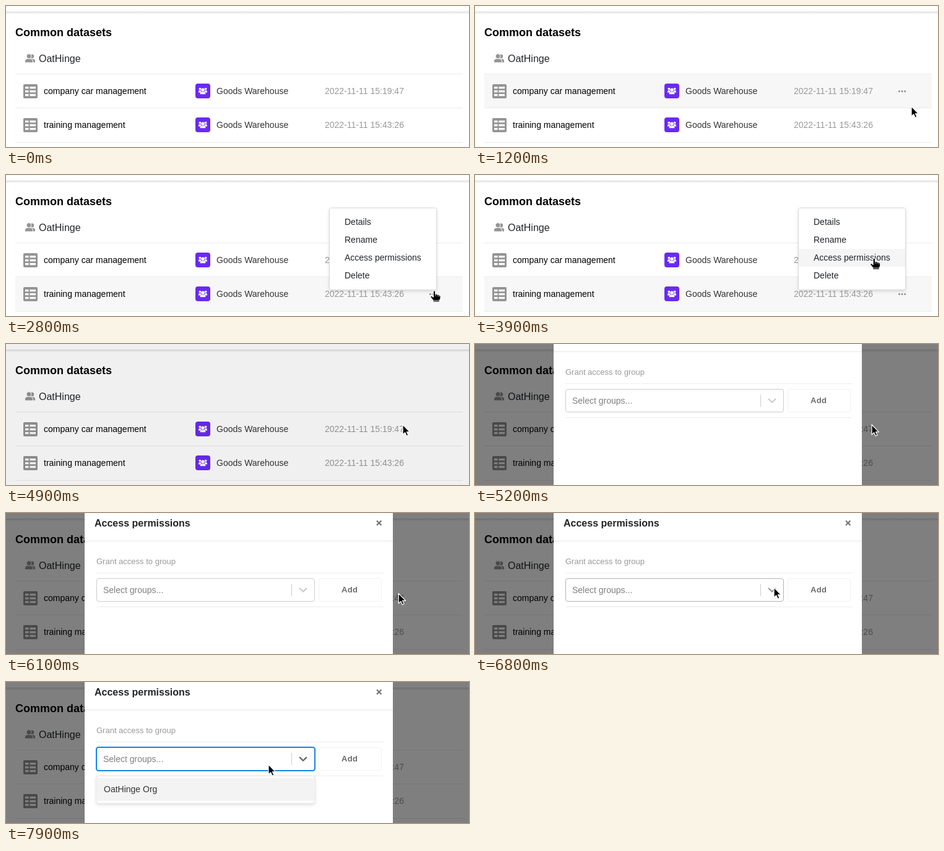
Write an HTML page that moves like this. It is 748 px wide and 229 px high and loops after 8 s.

```html
<!DOCTYPE html>
<html lang="en">
<head>
<meta charset="utf-8">
<title>Access permissions</title>
<style>
  html, body { margin: 0; width: 100%; height: 100%; overflow: hidden; background: #fff; }
  svg { display: block; font: 14px "Liberation Sans", Arial, sans-serif; }
  text { white-space: pre; }
</style>
</head>
<body>
<svg width="748" height="229" viewBox="0 0 748 229">
  <defs>
    <linearGradient id="fade" x2="0" y2="1">
      <stop stop-color="#e9e9e9"/><stop offset="1" stop-color="#fff"/>
    </linearGradient>
    <filter id="soft" x="-10%" y="-20%" width="120%" height="150%">
      <feDropShadow dx="0" dy="2" stdDeviation="2.5" flood-opacity=".13"/>
    </filter>
    <g id="table">
      <rect width="23" height="23" rx="2" fill="#949494"/>
      <path d="M3 4h5.5v3.2H3zM10.5 4H20v3.2h-9.5zM3 10h5.5v3.2H3zM10.5 10H20v3.2h-9.5zM3 16h5.5v3.2H3zM10.5 16H20v3.2h-9.5z" fill="#fff"/>
    </g>
    <g id="team">
      <rect width="24" height="24" rx="4" fill="#6a2af2"/>
      <g fill="#fff">
        <circle cx="7.4" cy="8.6" r="1.9"/><circle cx="16.6" cy="8.6" r="1.9"/>
        <path d="M5 14.5v-1.6q0-2 2-2h1.3q.6 1.8 1.9 2.4-1.6.5-2 1.2zM19 14.5v-1.6q0-2-2-2h-1.3q-.6 1.8-1.9 2.4 1.6.5 2 1.2z"/>
        <circle cx="12" cy="10.2" r="2.7"/>
        <path d="M7.6 17.2v-.8q0-2.9 2.8-2.9h3.2q2.8 0 2.8 2.9v.8z"/>
      </g>
    </g>
    <g id="dots" fill="#8f8f8f">
      <circle r="1.5"/><circle cx="4.6" r="1.5"/><circle cx="9.2" r="1.5"/>
    </g>
  </defs>

  <rect width="748" height="229" fill="#fff"/>
  <rect y="9" width="748" height="1.5" fill="#dedede"/>
  <rect y="10.5" width="748" height="3" fill="url(#fade)"/>
  <text x="15" y="49" font-size="18" font-weight="700">Common datasets</text>
  <g fill="#949494">
    <circle cx="42" cy="81.8" r="3.2"/>
    <path d="M41 91.5v-5.6h2q4 0 4 3.4v2.2z"/>
    <g stroke="#fff" stroke-width="1">
      <circle cx="37" cy="81.6" r="4"/>
      <path d="M30.5 92v-2.4q0-4 4-4h5q4 0 4 4V92z"/>
    </g>
  </g>
  <text x="53" y="91" font-size="16" fill="#212529">OatHinge</text>
  <g id="rows"></g>
  <path d="M15 110.5H738M15 165.5H738M15 221.5H738" stroke="#ebebeb"/>

  <g id="menu">
    <rect x="522.5" y="53.5" width="173" height="133" rx="3" fill="#fff" stroke="#dadada" filter="url(#soft)"/>
    <rect id="hot" x="523" width="172" height="29" fill="#f5f5f5"/>
    <g id="items" fill="#212529"></g>
    <rect id="ring" x="522.5" y="120.5" width="173" height="29" fill="none" stroke="#777"/>
  </g>

  <rect id="shade" width="748" height="229"/>

  <g id="modal">
    <rect x="127" y="-40" width="498" height="340" fill="#fff"/>
    <text x="143" y="22" font-size="16" font-weight="700" fill="#212529">Access permissions</text>
    <path d="M599 12.5l7.4 7.4M606.4 12.5l-7.4 7.4" stroke="#777" stroke-width="2.2"/>
    <path d="M127 45.5H625" stroke="#e6e6e6"/>
    <text x="146" y="83" font-size="13" fill="#999">Grant access to group</text>
    <path d="M146 97.5H610M146 152.5H610" stroke="#ededed"/>
    <rect id="box" rx="3.5" fill="#fff"/>
    <text x="157" y="130" fill="#808080">Select groups...</text>
    <path d="M461.5 115V135" stroke="#ccc"/>
    <path id="chev" d="M474.8 122.6l5.2 5.2 5.2-5.2" fill="none" stroke-width="2.3" stroke-linecap="round" stroke-linejoin="round"/>
    <rect x="505.5" y="106.5" width="101" height="37" rx="3" fill="#fff" stroke="#f1f1f1"/>
    <text x="555.2" y="129" font-size="13" font-weight="700" letter-spacing=".3" text-anchor="middle" fill="#6a6a6a">Add</text>
    <g id="drop">
      <rect x="146" y="152.5" width="353" height="44.5" rx="3.5" fill="#fff" stroke="#e2e2e2" filter="url(#soft)"/>
      <rect x="146.5" y="156" width="352" height="37" fill="#f3f3f3"/>
      <text x="158" y="179" fill="#333">OatHinge Org</text>
    </g>
  </g>

  <g id="cursor" stroke="#fff" stroke-linejoin="round">
    <path id="arrow" d="M0 0V16.2L3.7 12.8 6.2 18.4 8.9 17.2 6.4 11.8H11.4Z" stroke-width="1.2"/>
    <g id="hand">
      <path d="M-1.7 1.4Q-1.7 0 0 0T1.7 1.4V5.4Q4.2 4.6 4.8 6.2 7 5.6 7.6 7.2 10 6.8 10 9V12Q9.6 14 8.4 15.4V18H-2V15.6L-6 10.6Q-6.6 8.4-4.4 8.4L-1.7 10.4Z" stroke-width="1.1"/>
      <path d="M1.8 6V9M4.9 7V9.4M7.6 7.8V10" stroke-width=".7"/>
      <path d="M-1.4 15.8H8" stroke-width=".8"/>
    </g>
  </g>
</svg>
<script>
const LOOP = 8000, STEP = 100;
const $ = id => document.getElementById(id);
const show = (id, on) => $(id).setAttribute('visibility', on ? 'inherit' : 'hidden');
const attrs = (id, o) => { for (const k in o) $(id).setAttribute(k, o[k]); };

const row = (i, name, date) => {
  const y = 111 + 55 * i;
  return `<rect id="bg${i}" x="15" y="${y}" width="723" height="${55 + i}" fill="#f7f7f7"/>
    <use href="#table" x="28" y="${y + 16}"/>
    <text x="61" y="${y + 32}">${name}</text>
    <use href="#team" x="306" y="${y + 15}"/>
    <text x="340" y="${y + 32}" fill="#333">Goods Warehouse</text>
    <text x="515" y="${y + 32}" fill="#999">${date}</text>
    <use id="more${i}" href="#dots" x="685.4" y="${y + 27.5}"/>`;
};
$('rows').innerHTML = row(0, 'company car management', '2022-11-11 15:19:47') +
  row(1, 'training management', '2022-11-11 15:43:26');
$('items').innerHTML = ['Details', 'Rename', 'Access permissions', 'Delete']
  .map((s, i) => `<text x="547" y="${81 + 29 * i}">${s}</text>`).join('');

// Keys are [time, value, ...]
const path = [
  [400, 578, -16], [1000, 695, 129], [1100, 695, 129], [1200, 705, 163], [1500, 704, 210],
  [2000, 690, 189], [2100, 692, 188], [3400, 692, 188], [4000, 641, 131],
  [6000, 641, 131], [6800, 483, 121], [7500, 483, 121], [7900, 424, 134]
];
const shade = [[4700, 0], [4900, .06], [5000, .3], [5100, .46], [5200, .5]];
const alpha = [[4900, 0], [5000, .1], [5100, .45], [5200, 1]];
const slide = [[5000, -50], [5100, -48], [5200, -33], [5300, -10], [5400, 0]];

const smooth = p => p * p * (3 - 2 * p);
function at(keys, t, ease = p => p) {
  if (t <= keys[0][0]) return keys[0].slice(1);
  const i = keys.findIndex(k => k[0] > t);
  if (i < 0) return keys[keys.length - 1].slice(1);
  const a = keys[i - 1], b = keys[i], p = ease((t - a[0]) / (b[0] - a[0]));
  return a.slice(1).map((v, j) => v + (b[j + 1] - v) * p);
}

function draw(t) {
  const [x, y] = at(path, t, smooth);
  const menu = t >= 2800 && t < 4800;
  const free = t >= 500 && t < 2800;
  const hover = [free && y >= 110 && y < 166, menu || (free && y >= 166)];
  hover.forEach((on, i) => { show('bg' + i, on); show('more' + i, on); });

  const item = Math.floor((y - 62) / 29);
  const inMenu = menu && x < 696 && y < 178;
  show('menu', menu);
  show('hot', inMenu);
  attrs('hot', { y: 62 + 29 * item });
  show('ring', menu && t >= 4600);

  const open = t >= 7100;
  const near = t > 6000 && x < 499;
  attrs('shade', { opacity: at(shade, t)[0] });
  attrs('modal', { opacity: at(alpha, t)[0], transform: `translate(0 ${at(slide, t)[0]})` });
  attrs('box', open
    ? { x: 146, y: 106, width: 353, height: 38, stroke: t < 7200 ? '#4f9fe6' : '#1384e6', 'stroke-width': 2 }
    : { x: 146.5, y: 106.5, width: 352, height: 37, stroke: near ? '#b3b3b3' : '#ccc', 'stroke-width': 1 });
  attrs('chev', { stroke: open ? '#666' : near ? '#999' : '#ccc' });
  show('drop', open);

  const hand = inMenu || (t >= 2100 && t < 3500);
  show('cursor', t >= 500);
  show('hand', t >= 500 && hand);
  show('arrow', t >= 500 && !hand);
  attrs('cursor', { transform: `translate(${x.toFixed(1)} ${y.toFixed(1)})` });
}

const start = performance.now();
function tick() {
  const t = (performance.now() - start) % LOOP;
  draw(Math.floor(t / STEP) * STEP);
  requestAnimationFrame(tick);
}
tick();
</script>
</body>
</html>
```
